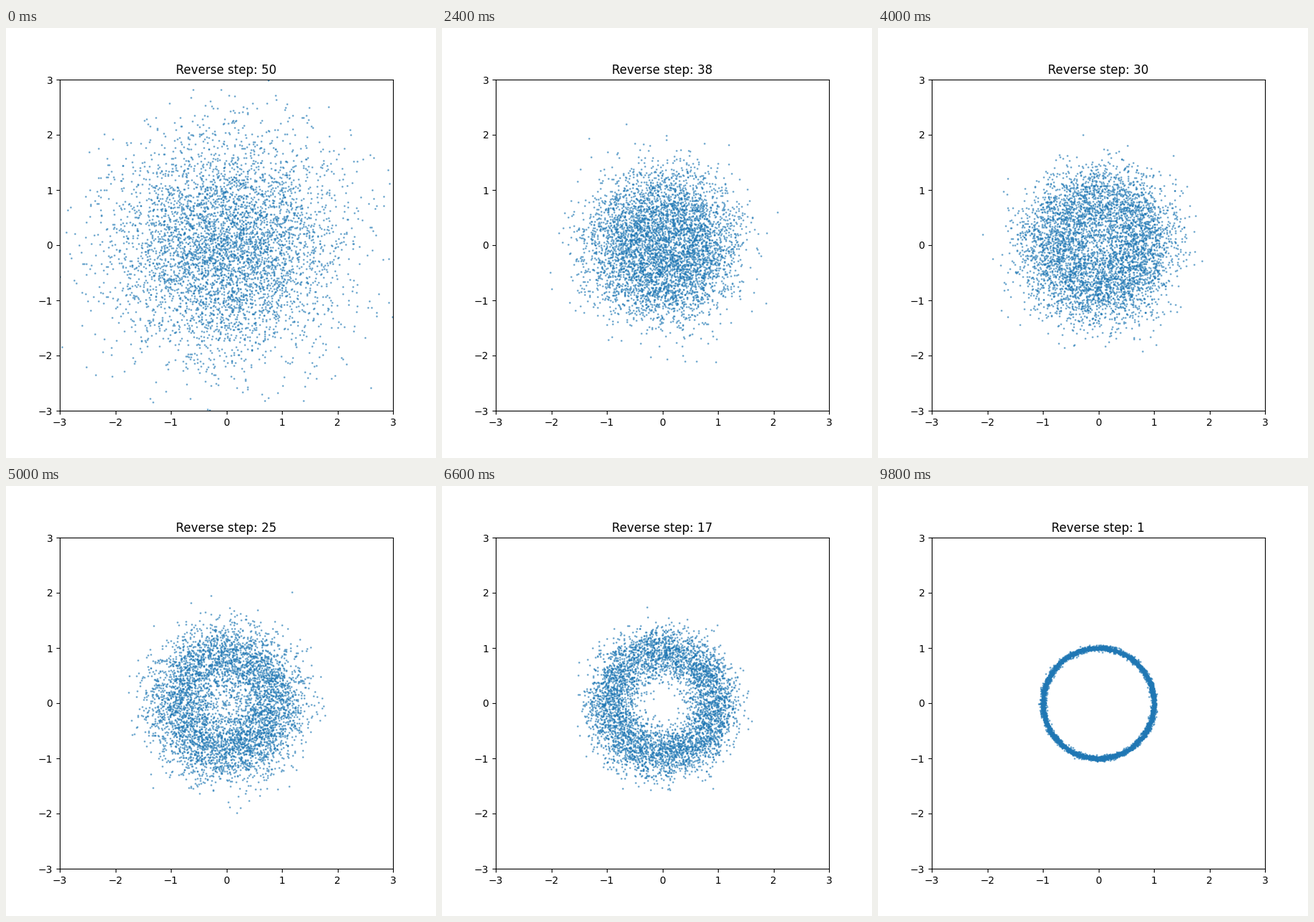
A matplotlib script that plays this animation: 600x600 px, repeating every 10 s.

```python
import numpy as np
import matplotlib.pyplot as plt
from matplotlib.animation import FuncAnimation

STEPS = 50
POINTS = 5000
SHARPNESS = 1.25  # how eagerly points leave the centre for the ring

beta = np.linspace(1e-4, 0.02, STEPS)
alpha = 1 - beta
alpha_bar = np.cumprod(alpha)


def expected_clean(x, ab):
    """Posterior mean on the unit circle given a noisy sample (Bessel ratio I1/I0)."""
    gain = SHARPNESS * np.sqrt(ab) / (1 - ab)
    kappa = gain * np.linalg.norm(x, axis=1, keepdims=True)
    return x * gain / (0.5 + np.sqrt(kappa**2 + 2.25))


def denoise(x, t, rng):
    ab = alpha_bar[t]
    score = (np.sqrt(ab) * expected_clean(x, ab) - x) / (1 - ab)
    mean = (x + beta[t] * score) / np.sqrt(alpha[t])
    # The first steps overshoot towards the centre.
    pull = 0.1 * max(0, (t - 41) / 8)
    return mean * (1 - pull) + np.sqrt(beta[t]) * rng.standard_normal(x.shape)


def sample():
    rng = np.random.default_rng(7)
    path = [rng.standard_normal((POINTS, 2))]
    for t in range(STEPS - 1, 0, -1):
        path.append(denoise(path[-1], t, rng))
    return path


path = sample()

fig, ax = plt.subplots(figsize=(6, 6), dpi=100)
dots = ax.scatter(path[0][:, 0], path[0][:, 1], s=1, alpha=0.5)
ax.set_xlim(-3, 3)
ax.set_ylim(-3, 3)
title = ax.set_title(f"Reverse step: {STEPS}")


def update(frame):
    dots.set_offsets(path[frame])
    title.set_text(f"Reverse step: {STEPS - frame}")
    return dots, title


anim = FuncAnimation(fig, update, frames=STEPS, interval=200,
                     repeat=True, repeat_delay=0, blit=False)
plt.show()
```
